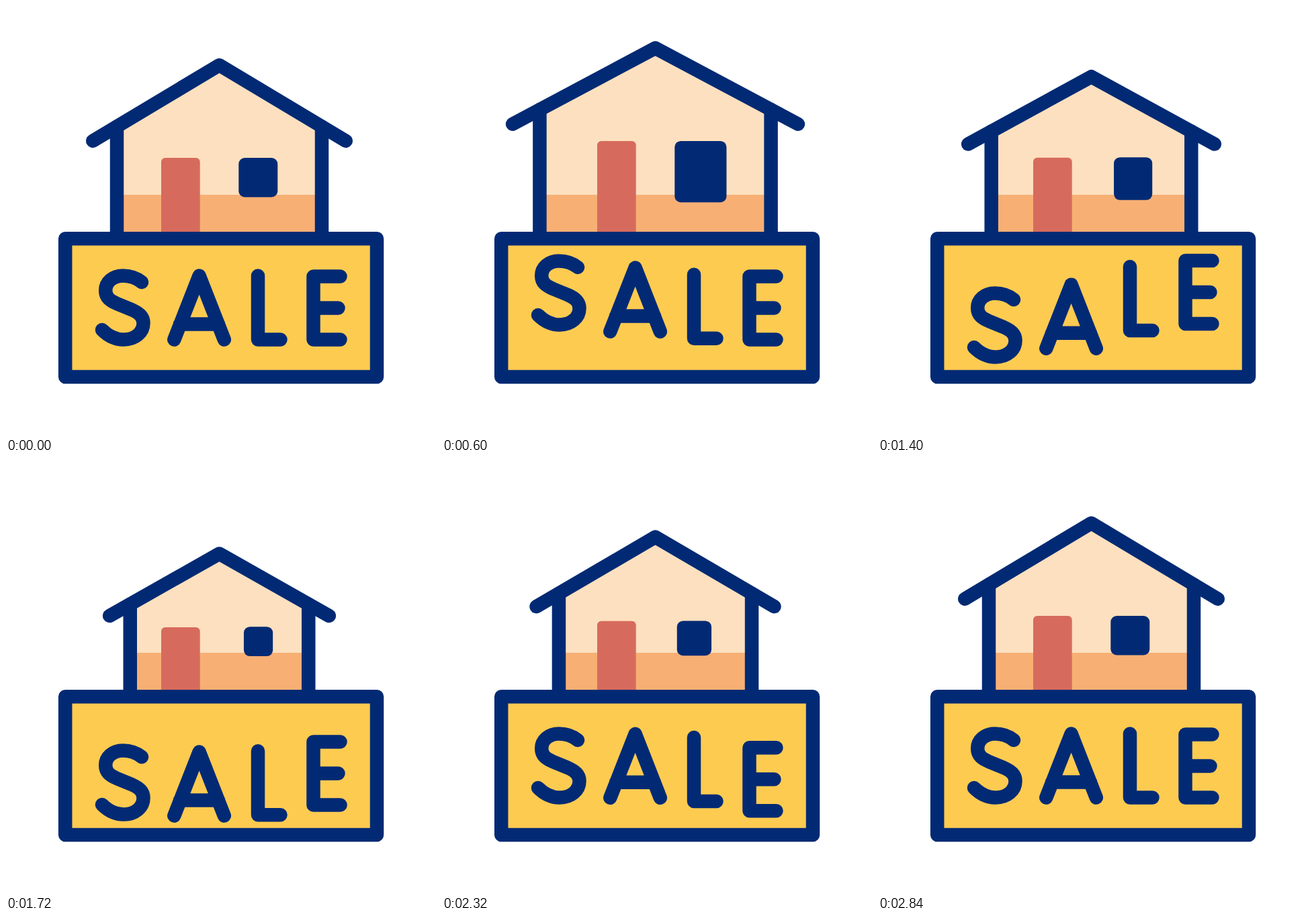
An HTML page that plays this animation: 640 by 640 pixels, repeating every 3 s.

```html
<!DOCTYPE html>
<html lang="en">
<head>
<meta charset="utf-8">
<title>House for sale</title>
<style>
  html, body { margin: 0; width: 100%; height: 100%; overflow: hidden; background: #fff; }
  svg { display: block; width: 100vw; height: 100vh; }
  .line { fill: none; stroke: #022a74; stroke-width: 20.5; stroke-linecap: round; stroke-linejoin: round; }
</style>
</head>
<body>
<svg viewBox="0 0 640 640">
  <clipPath id="shape"><path id="front"/></clipPath>
  <g clip-path="url(#shape)">
    <rect width="640" height="281" fill="#fde0bf"/>
    <rect y="281" width="640" height="70" fill="#f7af74"/>
  </g>
  <rect id="door" x="231" width="57.7" rx="6" fill="#d66b5d"/>
  <rect id="pane" rx="9" fill="#022a74"/>
  <path id="walls" class="line"/>
  <path id="roof" class="line"/>
  <rect class="line" x="88.2" y="346.2" width="463.8" height="205.8" style="fill:#fecb51"/>
  <g class="line">
    <path class="letter" d="M202 411C194 404.500 185 401.500 174 401.500C159 401.500 148.200 411 148.200 423.500C148.200 434 155 438.500 165 443L187 452C198 457 204.500 462 204.500 472C204.500 486 192 496.500 175 496.500C162 496.500 152 491 143 482"/>
    <path class="letter" d="M250.300 496.500L287.600 401.500L324.800 496.500M259 473.500H316"/>
    <path class="letter" d="M375 401.500V496.500H408.500"/>
    <path class="letter" d="M497.500 402.500H457.500V496.500H497.500M457.500 449.500H494.500"/>
  </g>
</svg>
<script>
const LOOP = 3000, STEP = 40, CENTER = 317.5, GROUND = 346;
const houseKeys = [0, 880, 1830, 2770];
const letterKeys = [70, 798, 1526, 2254];
const letterDelay = 167;

// Resting, stretched and shrunken poses
const poses = {
  apex:    [88, 58.8, 134],
  eaveX:   [188.2, 216, 163],
  eaveY:   [200.8, 172, 226.3],
  wall:    [152.5, 175, 132.5],
  door:    [226, 197.3, 243.3],
  left:    [346.3, 346.3, 354],
  right:   [404.3, 426.3, 397],
  top:     [226, 197.2, 242.5],
  bottom:  [284.5, 293.3, 286]
};
const letterPose = [0, -24, 27];

const $ = id => document.getElementById(id);
const set = (el, attrs) => {
  for (const name in attrs) el.setAttribute(name, attrs[name]);
};

function ease(u) {
  const a = u ** 2.5, b = (1 - u) ** 2.5;
  return a / (a + b);
}

// Value at time t on the way rest -> pose 1 -> pose 2 -> rest
function tween(t, keys, [rest, one, two]) {
  const values = [rest, one, two, rest];
  if (t <= keys[0] || t >= keys[3]) return rest;
  const i = t < keys[1] ? 0 : t < keys[2] ? 1 : 2;
  const u = (t - keys[i]) / (keys[i + 1] - keys[i]);
  return values[i] + (values[i + 1] - values[i]) * ease(u);
}

function drawHouse(t) {
  const h = {};
  for (const name in poses) h[name] = tween(t, houseKeys, poses[name]);

  const wallTop = h.apex + (h.eaveY - h.apex) * h.wall / h.eaveX;
  const x1 = CENTER - h.wall, x2 = CENTER + h.wall;
  set($('front'), { d: `M${x1} ${GROUND}V${wallTop}L${CENTER} ${h.apex}L${x2} ${wallTop}V${GROUND}Z` });
  set($('walls'), { d: `M${x1} ${GROUND}V${wallTop}M${x2} ${GROUND}V${wallTop}` });
  set($('roof'), { d: `M${CENTER - h.eaveX} ${h.eaveY}L${CENTER} ${h.apex}L${CENTER + h.eaveX} ${h.eaveY}` });
  set($('door'), { y: h.door, height: GROUND - h.door });
  set($('pane'), { x: h.left, y: h.top, width: h.right - h.left, height: h.bottom - h.top });
}

const letters = document.querySelectorAll('.letter');

function draw(now) {
  const t = Math.floor(now % LOOP / STEP) * STEP;
  drawHouse(t);
  letters.forEach((letter, i) => {
    const y = tween(t - i * letterDelay, letterKeys, letterPose);
    set(letter, { transform: `translate(0 ${y})` });
  });
}

function frame() {
  draw(performance.now());
  requestAnimationFrame(frame);
}
frame();
</script>
</body>
</html>
```
